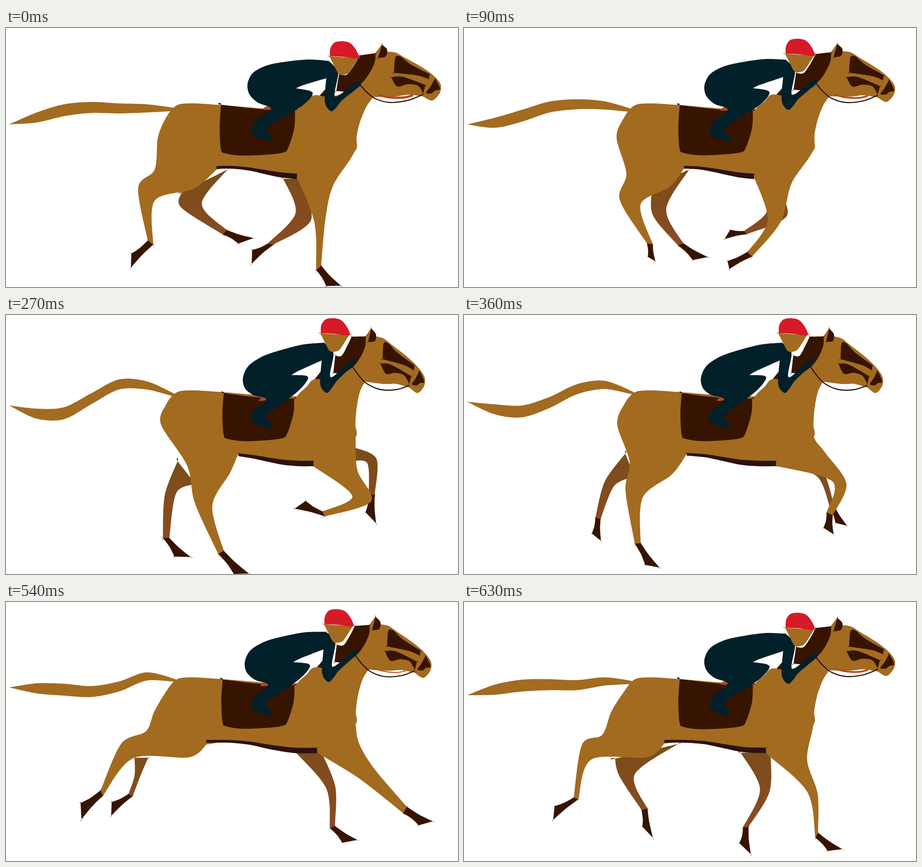
Animation, 988 px wide and 567 px high, one loop 0.72 s. Source, as an HTML page with a canvas:

```html
<!DOCTYPE html>
<html lang="en">
<head>
<meta charset="utf-8">
<title>Gallop</title>
<style>
html, body { margin: 0; width: 100%; height: 100%; overflow: hidden; background: #fff; }
canvas { display: block; width: 988px; height: 567px; }
</style>
</head>
<body>
<canvas id="stage" width="988" height="567"></canvas>
<script>
const ctx = document.getElementById('stage').getContext('2d');
const STEP = 90, POSES = 8;
const COAT = '#a26b20', DARK = '#371400', NAVY = '#02202a', RED = '#d61a28', RUST = '#b5481f', STRAP = '#2b120c';
const shade = ctx.createLinearGradient(0, 320, 0, 480);
shade.addColorStop(0, '#7b4d1a');
shade.addColorStop(1, '#8a4a22');

const clamp = v => Math.max(0, Math.min(1, v));
const mix = (a, b, t) => ({ x: a.x + (b.x - a.x) * t, y: a.y + (b.y - a.y) * t });
const sharp = p => ({ ...p, corner: true });

// "x,y" is a smooth point, "x,y!" a corner
const parse = s => s.split(' ').map(w => {
  const [x, y] = w.split(',').map(parseFloat);
  return { x, y, corner: w.endsWith('!') };
});

function curve(pts, closed = true) {
  const p = pts.flatMap(q => q.corner ? [q, q] : [q]);
  const n = p.length;
  const at = i => closed ? p[(i + n) % n] : p[Math.max(0, Math.min(n - 1, i))];
  const path = new Path2D();
  path.moveTo(p[0].x, p[0].y);
  for (let i = 0; i < (closed ? n : n - 1); i++) {
    const a = at(i - 1), b = at(i), c = at(i + 1), d = at(i + 2);
    path.bezierCurveTo(b.x + (c.x - a.x) / 6.5, b.y + (c.y - a.y) / 6.5,
      c.x - (d.x - b.x) / 6.5, c.y - (d.y - b.y) / 6.5, c.x, c.y);
  }
  return path;
}

// An empty row is the midpoint of its neighbours.
function track(rows) {
  const keys = rows.map(r => r && parse(r));
  return keys.map((r, i) => r || keys[i - 1].map((p, j) => mix(p, keys[i + 1][j], 0.5)));
}

// Leg rows run down the back edge and up the front edge; the last two points are the sole.
const hind = track([
  '332,240 325,310 289,350 310,465 322,474 325,378 410,352 460,310 274,494 273,525',
  '',
  '335,240 385,328 392,403 490,478 503,472 447,395 490,343 502,305 530,508 564,497',
  '339,240 396,330 413,412 464,523 476,516 451,418 490,345 508,303 498,567 531,566',
  '',
  '331,240 328,312 293,357 283,478 296,482 330,382 420,352 466,305 294,527 324,540',
  '324,240 306,283 252,310 207,412 212,424 278,342 400,340 438,312 163,440 165,476',
  '322,240 302,291 258,312 240,428 250,432 278,345 400,340 438,310 198,447 195,477'
]);
const fore = track([
  '634,322 674,425 678,530 689,520 698,420 715,345 700,565 732,564',
  '632,322 664,420 620,490 630,500 692,425 716,340 576,510 580,528',
  '630,322 657,412 588,457 583,468 685,435 703,362 543,450 524,474',
  '670,330 757,396 692,430 697,441 798,408 768,340 655,407 631,424',
  '680,330 805,364 793,432 806,438 836,370 790,302 786,466 808,480',
  '690,328 838,354 922,398 930,385 840,328 785,290 953,422 988,411',
  '678,329 770,385 868,462 876,448 805,365 772,310 902,489 933,480',
  '658,330 750,415 768,516 774,505 773,420 750,345 795,545 827,541'
]);
const farHind = track([
  '384,360 383,393 474,452 482,442 428,385 484,310 508,472 541,460',
  '',
  '440,330 442,425 462,500 476,500 456,408 500,310 492,544 525,543',
  '375,320 347,395 343,488 357,488 372,390 414,370 368,529 404,530',
  '',
  '330,287 268,335 232,398 240,405 285,358 332,338 191,428 195,459',
  '281,341 281,380 268,420 277,425 296,375 311,341 231,438 230,468',
  '330,343 340,382 388,455 401,452 373,378 467,311 390,492 413,516'
]);
const farFore = track([
  '606,330 633,405 572,472 585,474 667,420 640,330 538,486 537,516',
  '',
  '690,360 690,400 652,417 653,428 745,402 720,340 626,397 602,408',
  '755,320 790,325 793,392 806,393 810,315 762,290 786,432 809,456',
  '',
  '655,332 757,385 808,455 812,442 758,368 695,330 838,478 866,467',
  '634,330 700,408 708,495 719,490 720,405 690,330 735,527 768,521',
  '605,330 647,410 610,493 622,492 668,415 670,330 602,528 627,552'
]);

// Height of the tail's centre line at even steps from root to tip.
const tailY = [
  [178, 176, 176, 174, 180, 196, 211],
  null,
  [183, 163, 158, 172, 204, 219, 211],
  [175, 154, 152, 183, 215, 216, 198],
  null,
  [165, 152, 173, 200, 207, 197, 182],
  [171, 163, 185, 196, 192, 189, 187],
  [176, 174, 182, 181, 183, 192, 204]
];
const tailWidth = [3, 9, 11, 12, 13, 11, 0];
const lift = [0, 0.25, 0.6, 1, 1, 1, 0.6, 0.25];

function tail(i) {
  const ys = tailY[i] || tailY[i - 1].map((y, j) => (y + tailY[i + 1][j]) / 2);
  const edge = side => ys.map((y, j) => ({ x: 367 - 60 * j, y: y + side * tailWidth[j], corner: j === 6 }));
  return curve([...edge(-1), ...edge(1).reverse()]);
}

function hoof(leg, ankle) {
  const [f, g] = [leg[ankle], leg[ankle + 1]];
  const [s, e] = leg.slice(-2);
  const axis = mix(mix(f, g, 0.5), mix(s, e, 0.5), 0.5);
  const waist = (a, b) => mix(mix(a, b, 0.5), axis, 0.2);
  return curve([sharp(f), waist(f, s), sharp(s), sharp(e), waist(g, e), sharp(g)]);
}

const farLeg = leg => curve(leg.slice(0, 6).map((p, j) => j === 1 || j === 4 ? p : sharp(p)));

// Underside of the barrel between flank and elbow.
function belly(from, to) {
  return [0, 1, 2, 3, 4, 5].map(j => {
    const x = from + (to - from) * j / 5;
    const u = clamp((x - 490) / 150);
    const s = u * u * (3 - 2 * u);
    return { x, y: 302 + 17 * s, h: 6 + 6 * s };
  });
}

const back = parse('640,178! 575,177 475,169 405,165 372,170 350,196');
const chest = parse('764,265 760,200!');

function body(i) {
  const h = hind[i].slice(0, 8).map((p, j) => j === 3 || j === 4 || j === 7 ? sharp(p) : p);
  const f = fore[i].slice(0, 6).map((p, j) => j === 0 || j === 2 || j === 3 ? sharp(p) : p);
  const under = belly(h[7].x, f[0].x).slice(1, -1).map(p => ({ x: p.x, y: p.y + 4 }));
  return curve([...back, ...h, ...under, ...f, ...chest]);
}

function girth(i) {
  const top = belly(hind[i][7].x, fore[i][0].x + 2);
  const low = top.map(p => ({ x: p.x, y: p.y + p.h })).reverse();
  const ends = (p, j) => j === 0 || j === 5 ? sharp(p) : p;
  return curve([...top.map(ends), ...low.map(ends)]);
}

const cloth = parse('470,168! 560,178 632,180! 630,220 617,262 605,273 560,278 510,279 478,274 470,266 467,220');
const seat = parse('562,177 572,171 582,173 576,179');
const head = parse('806,57! 822,35! 834,52! 852,54 872,65 908,85 932,102 948,119 951,132 946,146 931,159 912,150! 880,146 850,150 803,151! 788,172 774,205 766,240 764,268 720,300 634,200 660,158 676,147 715,150 775,121');
const mane = parse('773,60! 808,55! 806,75 795,98 778,120 750,138 722,138! 728,101! 745,102 762,80');
const tuft = parse('682,152! 698,134! 702,155!');
const ear = parse('813,66! 822,37! 833,47 830,62');
const brow = parse('848,98! 849,80 852,63 863,63 885,80 926,101! 924,112! 900,104');
const cheek = parse('842,108! 868,107 917,125! 912,143! 900,126 878,123 855,128');
const muzzle = parse('938,110! 949,133 938,137 930,143 918,142 928,128');
const rein = parse('772,122 788,140 808,155 840,163 880,158 912,145');
const lip = parse('815,147 840,152 870,152 890,147');
const rider = parse('705,72! 660,69 610,74 570,82 540,98 528,122 532,145 550,163 579,177 548,202 538,220 538,232 550,241 582,248 580,238 572,228 576,214 645,172 669,148 665,138 634,132! 650,125 700,110! 697,162 710,182 722,174 735,158 775,125 765,119 720,150 726,100 716,82');
const face = parse('707,62! 770,66! 753,93 744,101 728,101 716,80');
const cap = parse('708,62! 709,45 718,32 735,29 752,33 764,46 772,64 765,67! 735,63');

// As the head lifts, the neck bends, the rider leans back and the cloth slides.
const neckBend = k => p => {
  const w = k * clamp((260 - p.y) / 100) * clamp((p.x - 640) / 120);
  return {
    ...p,
    x: p.x + w * (-22 - 0.11 * (p.x - 822) + 0.03 * (p.y - 90)),
    y: p.y + w * (-5 + 0.13 * (p.x - 822) + 0.04 * (p.y - 90))
  };
};
const lean = k => p => {
  const w = k * clamp((230 - p.y) / 50);
  return { ...p, x: p.x - 10 * w, y: p.y + w * (12 - 0.15 * (p.x - 550)) };
};
const bob = k => p => ({ ...p, x: p.x - 20 * k, y: p.y - 22 * k });
const slide = k => p => ({
  ...p, x: p.x + k * (p.x < 520 ? 6 : -2), y: p.y + k * (p.y < 200 ? 3 : -3)
});

function fill(color, ...paths) {
  ctx.fillStyle = color;
  for (const p of paths) ctx.fill(p);
}

function line(color, width, pts) {
  ctx.strokeStyle = color;
  ctx.lineWidth = width;
  ctx.stroke(curve(pts, false));
}

function draw(i) {
  const k = lift[i];
  const bend = neckBend(k);
  const shape = (pts, move) => curve(pts.map(move));
  ctx.clearRect(0, 0, 988, 567);
  fill(COAT, tail(i));
  fill(shade, farLeg(farHind[i]), farLeg(farFore[i]));
  fill(DARK, hoof(farHind[i], 2), hoof(farFore[i], 2));
  fill(COAT, body(i));
  fill(STRAP, girth(i));
  fill(DARK, hoof(hind[i], 3), hoof(fore[i], 2), shape(cloth, slide(k)), shape(tuft, lean(k)));
  fill(RUST, shape(seat, lean(k)));
  fill(COAT, shape(head, bend));
  if (k < 1) line(RUST, 5 * (1 - k), lip.map(bend));
  fill(DARK, ...[mane, ear, brow, cheek, muzzle].map(s => shape(s, bend)));
  line(STRAP, 2.4, rein.map(bend));
  fill(NAVY, shape(rider, lean(k)));
  fill(COAT, shape(face, bob(k)));
  fill(RED, shape(cap, bob(k)));
}

const start = performance.now();
function tick() {
  const t = Math.max(0, performance.now() - start);
  draw(Math.floor(t / STEP) % POSES);
  requestAnimationFrame(tick);
}
tick();
</script>
</body>
</html>
```
